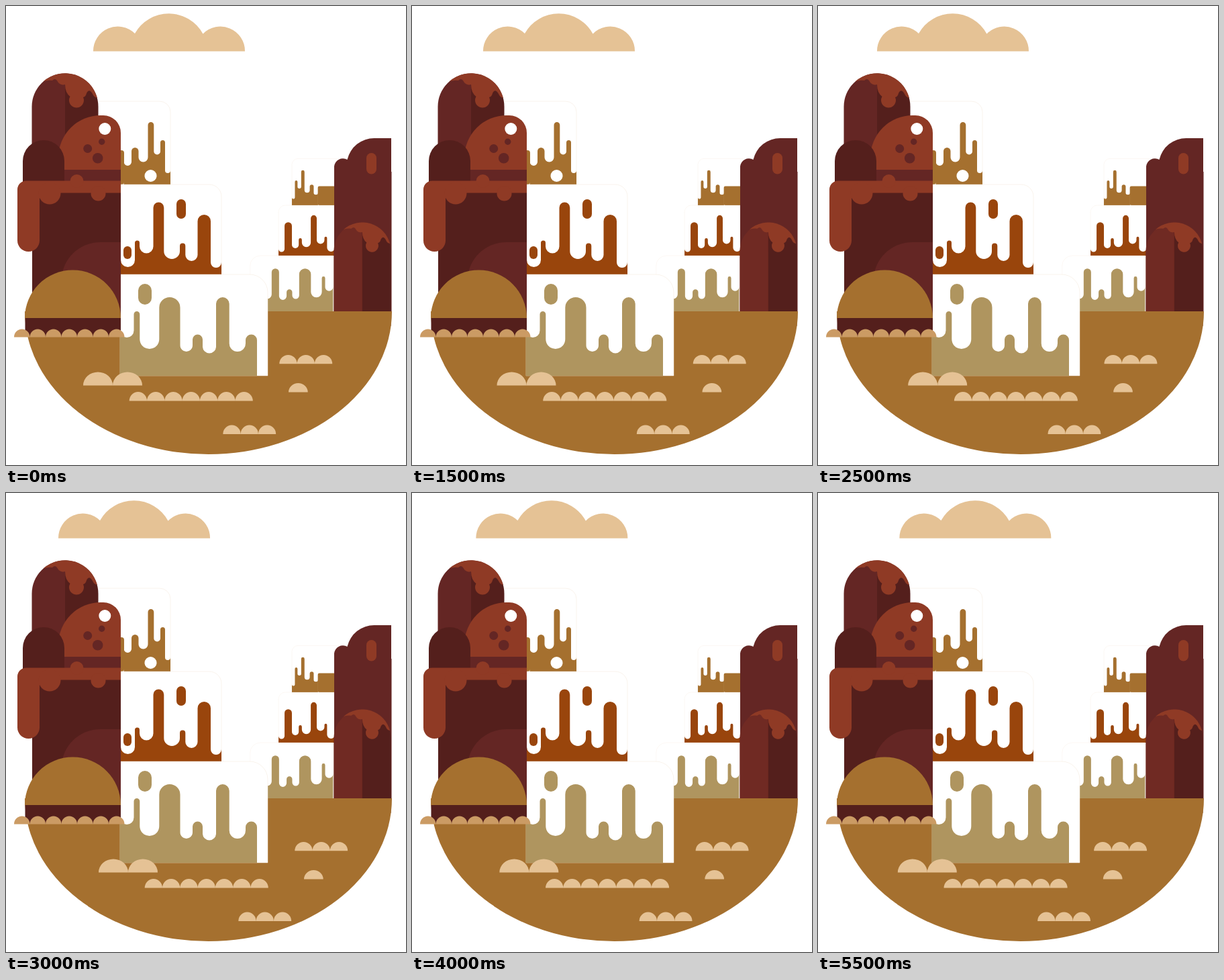
An HTML page that plays this animation: 596 by 684 pixels, repeating every 6 s.

```html
<!DOCTYPE html>
<html lang="en">
<head>
<meta charset="utf-8">
<title>Drip cakes</title>
<style>
html, body { margin: 0; width: 100%; height: 100%; overflow: hidden; background: #fff; }
svg { display: block; width: 596px; height: 684px; }
.white { fill: #fff; }
.icing { fill: #fff; stroke: #f3e6d8; stroke-width: .5; }
.tan { fill: #e5c295; }
.brown { fill: #a5702f; }
.rust { fill: #99450c; }
.olive { fill: #af955f; }
.red { fill: #8f3a25; }
.maroon { fill: #642624; }
.dark { fill: #541f1c; }
.lace { fill: #cb9b64; }
</style>
</head>
<body>
<svg viewBox="0 0 596 684">
  <defs>
    <g id="tower">
      <path d="M38.5 280V150A49.5 49.5 0 0 1 88 100.500V280Z"/>
      <path class="dark" d="M88 280V100.500A49.5 49.5 0 0 1 137.500 150V280Z"/>
      <path class="red" d="M55.500 112.500A49.500 49.500 0 0 1 136 137Q131 136 129 131Q124 122 120 130Q119 135 115 136A11 11 0 1 1 95.500 135Q88 129 88 117Q80 119 76 111Q73 107 69 111Q62 110 55.500 112.500Z"/>
    </g>
  </defs>

  <path id="cloud" class="tan" d="M130 67.500A36.500 36.500 0 0 1 192 41A58 58 0 0 1 293.500 41.500A36.500 36.500 0 0 1 356 67.500Z"/>

  <g id="backCake"></g>
  <path class="maroon" d="M489 455V239A13 13 0 0 1 508.500 229A41 41 0 0 1 549 197H574V247H574.500V455Z"/>
  <use href="#tower" fill="#702a23" transform="translate(455.200 236.300) scale(.86)"/>
  <rect class="red" x="537" y="219" width="15" height="31.500" rx="7.500"/>

  <path class="brown" d="M28 455H575A273.500 213 0 0 1 28 455Z"/>

  <g id="frontCake"></g>
  <rect class="olive" x="197" y="414" width="20" height="31" rx="10"/>
  <rect class="rust" x="254" y="288" width="14" height="29" rx="7"/>
  <rect class="rust" x="175" y="358" width="12" height="19" rx="6"/>
  <circle class="white" cx="215.500" cy="253" r="9"/>

  <use href="#tower" class="maroon"/>
  <path class="red" d="M78 245V226A63 63 0 0 1 141 163H145A26 26 0 0 1 171 189V245Z"/>
  <rect class="maroon" x="78" y="244" width="93" height="18"/>
  <circle class="white" cx="147.300" cy="183" r="9"/>
  <g class="maroon">
    <circle cx="121.700" cy="212.500" r="6.500"/>
    <circle cx="142.700" cy="202.300" r="4.700"/>
    <circle cx="136.700" cy="226.700" r="7.800"/>
  </g>
  <path class="dark" d="M25 262V231A31 31 0 0 1 87 231V262Z"/>
  <rect class="dark" x="39" y="270" width="132" height="195"/>
  <path class="maroon" d="M83 465V408A58 56 0 0 1 141 352H171V465Z"/>
  <g class="red">
    <path d="M30 260.500H171V278.500H50V349.500A16.500 16.500 0 0 1 17 349.500V273.500A13 13 0 0 1 30 260.500Z"/>
    <circle cx="105.500" cy="261" r="10"/>
    <circle cx="65" cy="279" r="16.500"/>
    <circle cx="137.500" cy="279.500" r="11"/>
  </g>
  <path class="brown" d="M28 465A71.500 71.500 0 0 1 171 465Z"/>
  <rect class="dark" x="28.500" y="465" width="142.500" height="28"/>
  <path id="lace" class="lace"/>
  <path id="waves" class="tan"/>
</svg>
<script>
const el = id => document.getElementById(id);

// Alternating half-round bays and fingers; each stop is [right edge, extreme y].
function drips(color, x, base, stops) {
  let d = `M${x} ${base}`;
  stops.forEach(([end, y], i) => {
    const r = (end - x) / 2, finger = i % 2;
    const side = finger ? y + r : y - r;
    d += `V${side}A${r} ${r} 0 0 ${finger} ${end} ${side}`;
    x = end;
  });
  return `<path class="${color}" d="${d}V${base}Z"/>`;
}

const icing = (left, right, top, base, r) =>
  `<path class="icing" d="M${left} ${base}V${top}H${right - r}a${r} ${r} 0 0 1 ${r} ${r}V${base}Z"/>`;

const tiers = [
  icing(125, 245, 142, 266, 16) + '<rect class="brown" x="125" y="215" width="51" height="51" rx="4"/>' +
    drips('brown', 175.5, 266, [[187, 238], [197.5, 211], [211.5, 232.5], [220.3, 173], [230, 221.5], [237, 200], [245, 249]]),
  icing(171, 321, 266, 400, 18) +
    drips('rust', 171, 400, [[192, 389], [199, 349.5], [219.5, 368.5], [235.3, 292.5], [259, 377], [267.3, 353.5], [285.5, 380], [305, 311], [321, 390]]),
  icing(170, 390, 400, 551, 27) +
    drips('olive', 169.5, 551, [[190.5, 494], [199.3, 455], [228.3, 511], [259.5, 434], [278, 515], [293, 489.5], [313, 517.5], [332.7, 434], [357, 515], [374, 489.5]])
];

// The far cake is the near one mirrored and shrunk, each tier shifted sideways.
const backX = [563.3, 586, 582.3];
el('frontCake').innerHTML = tiers.join('');
el('backCake').innerHTML = tiers.map((tier, i) =>
  `<g transform="translate(${backX[i]} 147.9) scale(-.5605 .5605)">${tier}</g>`).join('');

const scallops = (x, y, count, w = 26.3, h = 13.4) =>
  `M${x} ${y}` + `a${w / 2} ${h} 0 0 1 ${w} 0`.repeat(count) + 'Z';

el('lace').setAttribute('d', scallops(12, 493.5, 7, 23.5, 12));
el('waves').setAttribute('d',
  scallops(115, 565.5, 2, 44, 20) +
  scallops(183.7, 588.5, 7) +
  scallops(407.3, 533.3, 3) +
  scallops(421, 575.5, 1, 28.7) +
  scallops(323.3, 638, 3));

// Both drift out for three seconds and back for three; the cloud speeds up after two.
const waveX = s => 23 * (1 - Math.abs(s / 3 - 1));
const cloudX = s => s < 3 ? -16 * s - 4 * Math.max(0, s - 2) : -52 * (2 - s / 3);

const start = performance.now();
function draw(now) {
  const s = Math.max(0, now - start) / 1000 % 6;
  el('cloud').setAttribute('transform', `translate(${cloudX(s)} 0)`);
  el('waves').setAttribute('transform', `translate(${waveX(s)} 0)`);
  requestAnimationFrame(draw);
}
draw(start);
</script>
</body>
</html>
```
